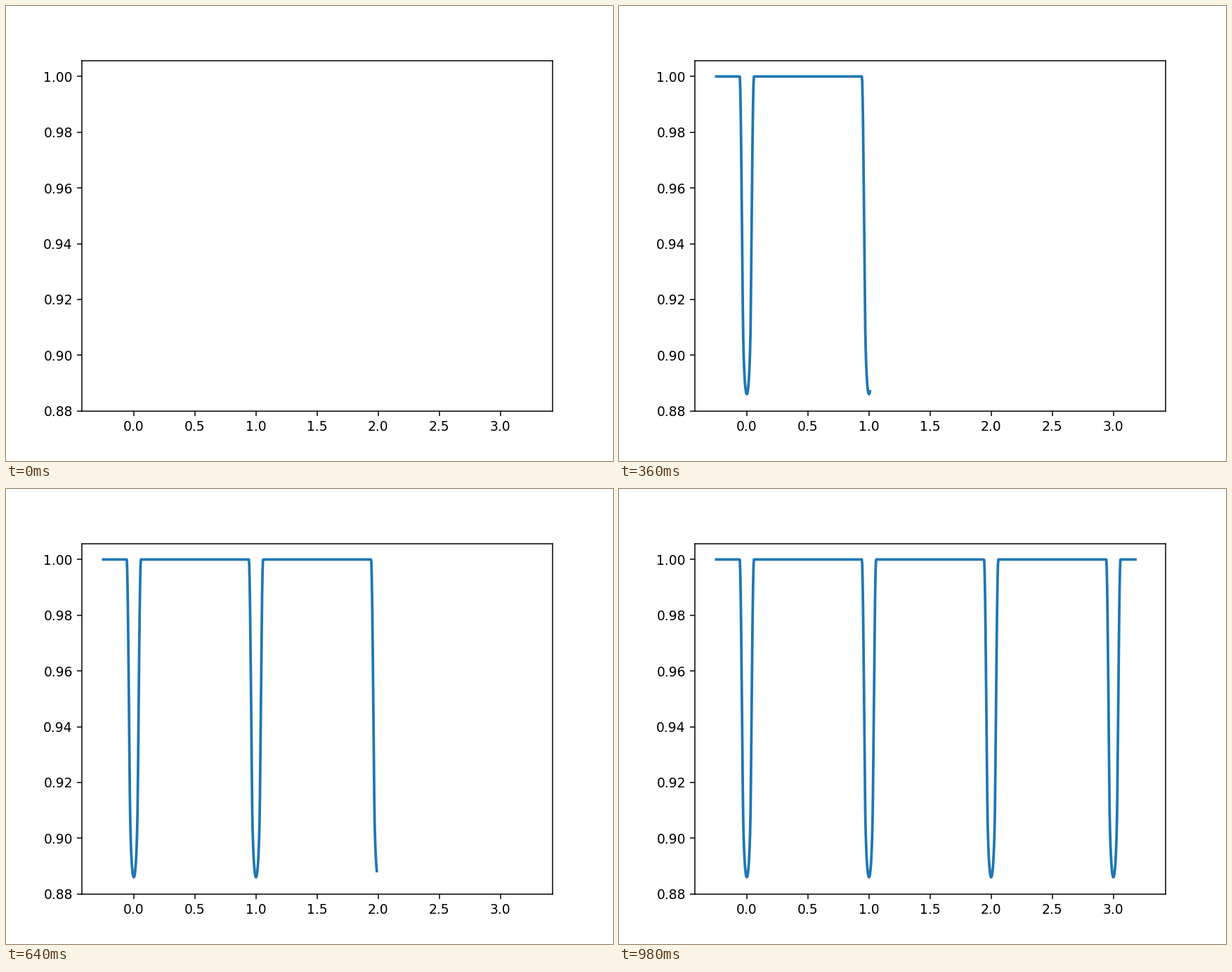
Write a matplotlib script that moves like this. It is 864 by 648 pixels and loops after 1000 ms.

```python
import numpy as np
import matplotlib.pyplot as plt
from matplotlib.animation import FuncAnimation

FRAMES = 50
POINTS_PER_FRAME = 20
RADIUS = 0.3          # planet radius in stellar radii
ORBIT = 3.66          # orbit radius in stellar radii
LIMB = (0.5, 0.3)     # quadratic limb darkening
DEPTH = 0.114


def transit_flux(time, rings=50, spokes=100):
    """Relative flux of a limb-darkened star crossed once per unit time."""
    phase = (time + 0.5) % 1 - 0.5
    dist = ORBIT * np.abs(np.sin(2 * np.pi * phase))
    crossing = (np.abs(phase) < 0.25) & (dist < 1 + RADIUS)

    # Equal-area samples over the planet's disc
    rho = RADIUS * np.sqrt((np.arange(rings) + 0.5) / rings)[:, None]
    angle = 2 * np.pi * (np.arange(spokes) + 0.5) / spokes

    def blocked(z):
        r2 = z**2 + rho**2 + 2 * z * rho * np.cos(angle)
        shade = 1 - np.sqrt(np.clip(1 - r2, 0, 1))
        light = 1 - LIMB[0] * shade - LIMB[1] * shade**2
        return np.mean(np.where(r2 < 1, light, 0))

    loss = np.zeros_like(time)
    loss[crossing] = [blocked(z) for z in dist[crossing]]
    return 1 - DEPTH * loss / loss.max()


time = np.linspace(-0.25, 3.25, FRAMES * POINTS_PER_FRAME)
flux = transit_flux(time)

fig, ax = plt.subplots(figsize=(6.4, 4.8), dpi=135)
ax.set_xlim(-0.425, 3.425)
ax.set_ylim(0.88, 1.0057)
ax.set_xticks(np.arange(0, 3.1, 0.5))
ax.set_yticks(np.linspace(0.88, 1.0, 7))
curve, = ax.plot([], [], color="C0", lw=2)


def update(frame):
    shown = frame * POINTS_PER_FRAME
    curve.set_data(time[:shown], flux[:shown])
    return curve,


anim = FuncAnimation(fig, update, frames=FRAMES, interval=20, repeat=True)
plt.show()
```
